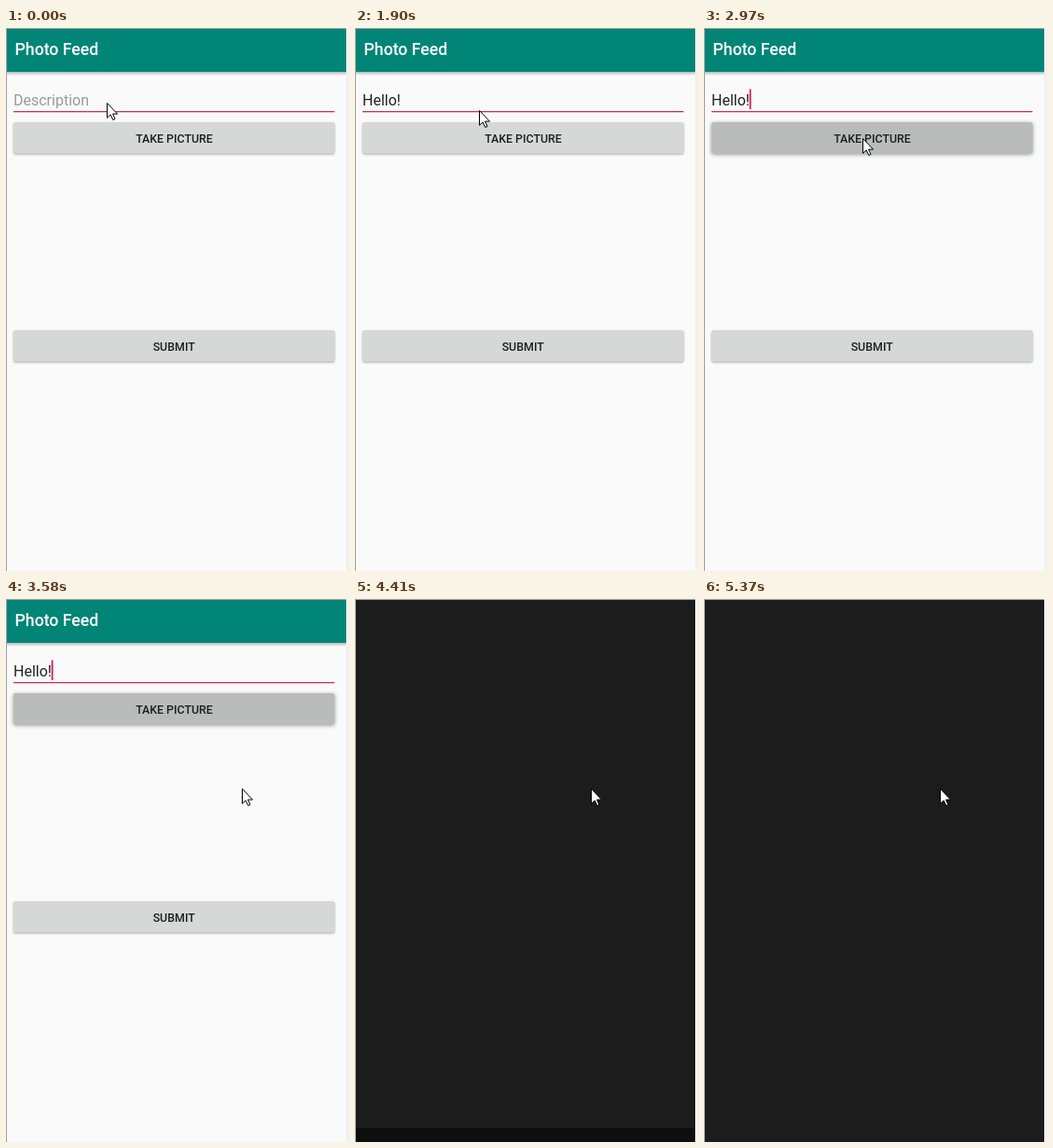
These frames come from a looping animation (368 by 582 pixels, 8 s). An HTML page:

```html
<!DOCTYPE html>
<html lang="en">
<head>
<meta charset="utf-8">
<title>Photo form</title>
<style>
  html, body { margin: 0; width: 100%; height: 100%; overflow: hidden; background: #f0f0f0; }
  svg { display: block; width: 368px; height: 582px; font-family: Roboto, sans-serif; }
  .button { filter: drop-shadow(0 1px 1px rgba(0, 0, 0, .32)); fill: #d6d8d7; }
  .button.pressed { filter: drop-shadow(0 1.5px 2px rgba(0, 0, 0, .4)); fill: #babcbb; }
  .label { font-size: 12.4px; font-weight: 500; text-anchor: middle; fill: #1f1f1f; }
</style>
</head>
<body>
<svg viewBox="0 0 368 582">
  <defs>
    <linearGradient id="barShadow" x2="0" y2="1">
      <stop stop-color="#000" stop-opacity=".26"/>
      <stop offset="1" stop-color="#000" stop-opacity="0"/>
    </linearGradient>
  </defs>

  <g id="form">
    <rect x="1" y="1" width="364" height="581" fill="#fafafa"/>
    <rect x="1" y="47" width="364" height="4" fill="url(#barShadow)"/>
    <rect x="1" y="1" width="364" height="46" fill="#008577"/>
    <text x="9.5" y="29" font-size="17.7" font-weight="500" fill="#fff">Photo Feed</text>

    <text id="field" x="8" y="82.5" font-size="16"></text>
    <rect id="caret" y="65.5" width="1.8" height="21.5" fill="#d81b60"/>
    <rect x="8" y="89" width="344.5" height="1.3" fill="#c9305c"/>

    <rect id="take" class="button" x="8" y="101" width="344.5" height="33.5" rx="2"/>
    <text class="label" x="180.5" y="123">TAKE PICTURE</text>
    <rect class="button" x="8" y="324" width="344.5" height="33.5" rx="2"/>
    <text class="label" x="180.2" y="345.5">SUBMIT</text>
  </g>

  <g id="camera">
    <rect x="1" y="1" width="364" height="581" fill="#1c1c1c"/>
    <rect id="navBar" x="1" y="567" width="364" height="15"/>
  </g>

  <path d="M0 .5H365M.5 0V582" stroke="#a0a0a0" fill="none"/>
  <path id="pointer" d="M.5 .5V16.3L4.2 12.9L6.8 18.5L9 17.5L6.5 12.1H11.5Z" fill="#fff" stroke="#000"/>
</svg>

<script>
const LOOP = 8000;
const el = id => document.getElementById(id);

// Each track is a list of [start time, value], held until the next entry.
const typed = [[0, ''], [440, 'H'], [860, 'He'], [980, 'Hel'], [1100, 'Hell'], [1220, 'Hello'], [1340, 'Hello!']];
const pointer = [[0, '108,80'], [1900, '133,88'], [2050, '156,104'], [2200, '170,118'], [3440, '243,189'], [3580, '253,203']];
const caretOn = [[0, false], [440, true], [1900, false], [2450, true]];
const navBar = [[0, 'none'], [4410, '#0e0e0e'], [4530, '#000'], [5370, 'none']];

const valueAt = (track, t) => track.findLast(([start]) => t >= start)[1];
const show = (id, on) => el(id).setAttribute('visibility', on ? 'visible' : 'hidden');

function draw(t) {
  const text = valueAt(typed, t);
  const inCamera = t >= 3700;

  el('field').textContent = text || 'Description';
  el('field').setAttribute('fill', text ? '#222' : '#999');
  el('caret').setAttribute('x', 7.8 + el('field').getComputedTextLength());
  show('caret', !inCamera && valueAt(caretOn, t));
  el('take').classList.toggle('pressed', t >= 2970);

  show('form', !inCamera);
  show('camera', inCamera);
  el('navBar').setAttribute('fill', valueAt(navBar, t));
  el('pointer').setAttribute('transform', `translate(${valueAt(pointer, t)})`);
}

const begin = performance.now();
function tick() {
  draw((performance.now() - begin) % LOOP);
  requestAnimationFrame(tick);
}
tick();
</script>
</body>
</html>
```
